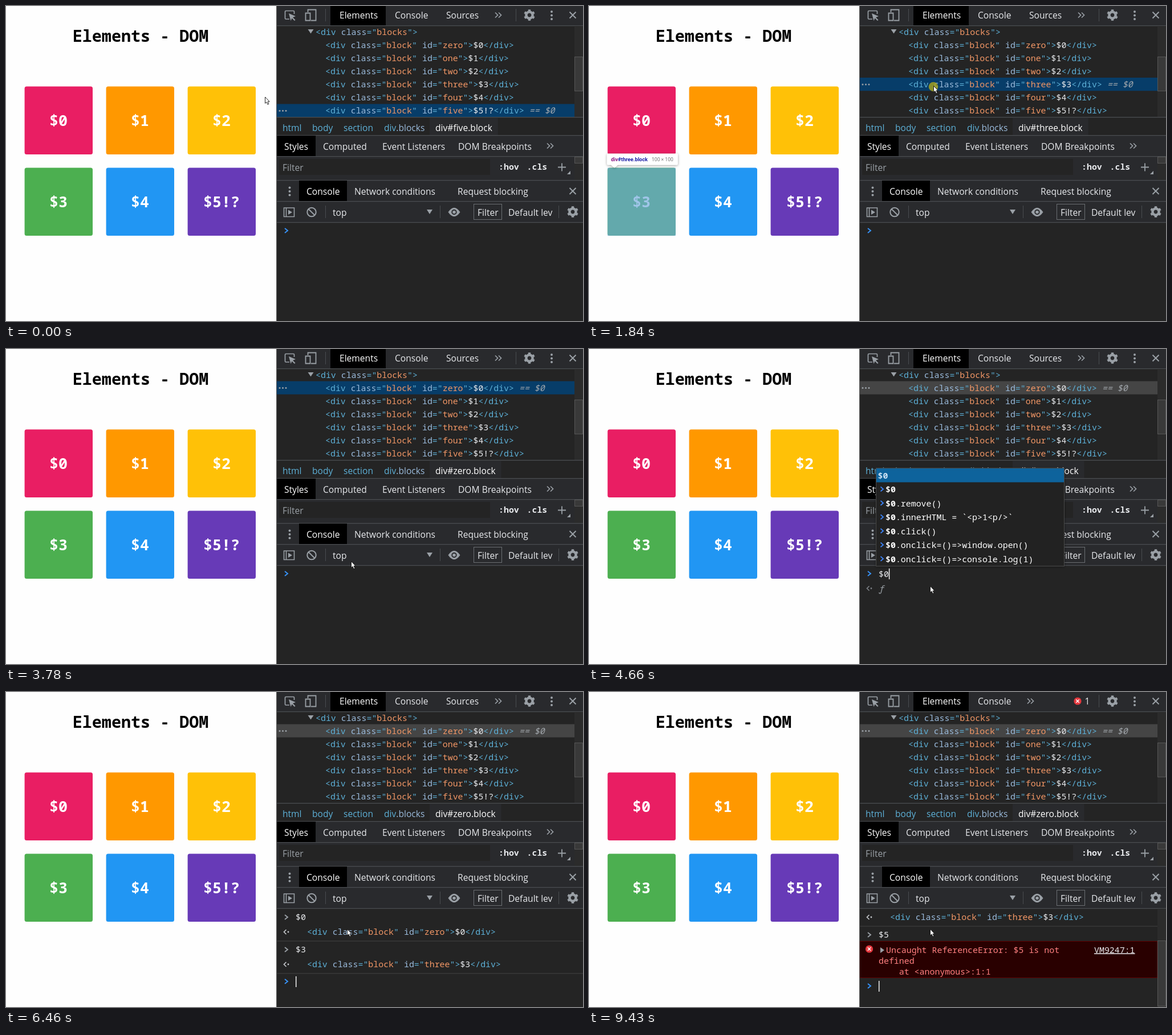
Write an HTML page that moves like this. It is 1012 by 554 pixels and loops after 9.61 s.

```html
<!DOCTYPE html>
<html lang="en">
<head>
<meta charset="utf-8">
<title>Elements - DOM</title>
<style>
html, body { margin: 0; width: 100%; height: 100%; overflow: hidden; background: #fefefe; }
svg { display: block; width: 1012px; height: 554px; }
text { white-space: pre; font: 15.6px "Open Sans", "Noto Sans", sans-serif; fill: #e8eaed; }
.m { font: 500 14.92px "Noto Sans Mono", "DejaVu Sans Mono", monospace; }
.b { font-weight: 700; }
.i { font-style: italic; }
.title { font: 600 28.4px "Noto Sans Mono", monospace; text-anchor: middle; fill: #000; }
.block { font: 700 26.7px "Noto Sans Mono", monospace; text-anchor: middle; fill: #fff; }
.tip { font: 700 9.2px Roboto, sans-serif; }
.size { font: 8.6px Roboto, sans-serif; }
.icon { fill: none; stroke: #9aa0a6; stroke-width: 2; }
</style>
</head>
<body>
<svg viewBox="0 0 1012 554">
  <defs>
    <clipPath id="log"><rect x="475" y="381" width="537" height="173"/></clipPath>
    <clipPath id="drop"><rect id="dropBox"/></clipPath>
    <filter id="shade" x="-20%" y="-20%" width="140%" height="160%">
      <feDropShadow dx="0" dy="1" stdDeviation="2" flood-opacity=".4"/>
    </filter>
  </defs>
  <g id="base"></g>
  <g id="view"></g>
  <g id="pointer">
    <circle id="press" r="8.3" cy="1.5" fill="#aaa51c"/>
    <path d="M.5 0V11.2L3 8.9L4.9 13.2L6.9 12.3L5 8.2H8.2Z" fill="#fff" stroke="#111" stroke-width=".9"/>
  </g>
</svg>
<script>
const LOOP = 9610, ROW = 23.15, TOP = 56.6, ITEM = 24.5;
const $ = id => document.getElementById(id);
const ids = ['zero', 'one', 'two', 'three', 'four', 'five'];
const labels = ['$0', '$1', '$2', '$3', '$4', '$5!?'];
const hues = ['#e91e63', '#ff9800', '#ffc107', '#4caf50', '#2196f3', '#673ab7'];
const TAG = '#5db0d7', ATTR = '#9bbbdc', VAL = '#f29766', GREY = '#9aa0a6', LINE = '#494c50';

// drawing helpers
const esc = s => s.replace(/&/g, '&amp;').replace(/</g, '&lt;');
const rect = (x, y, w, h, fill, more = '') =>
  `<rect x="${x}" y="${y}" width="${w}" height="${h}" fill="${fill}" ${more}/>`;
const path = (d, more = 'class="icon"') => `<path d="${d}" ${more}/>`;
const stroke = (d, width, color = GREY) => path(d, `fill="none" stroke="${color}" stroke-width="${width}"`);
const fill = d => path(d, `fill="${GREY}"`);
const dot = (x, y, r, color = GREY) => `<circle cx="${x}" cy="${y}" r="${r}" fill="${color}"/>`;
const span = (s, color, cls = '') => `<tspan fill="${color}" class="${cls}">${esc(s)}</tspan>`;
const rich = (x, y, inner, cls = 'm') => `<text x="${x}" y="${y}" class="${cls}">${inner}</text>`;
const text = (x, y, s, color = '#e8eaed', cls = '') => rich(x, y, span(s, color), cls);
const pen = document.createElement('canvas').getContext('2d');
const measure = (s, font) => (pen.font = font, pen.measureText(s).width);

const attr = (name, v) => span(' ' + name, ATTR) + span('="', TAG) + span(v, VAL) + span('"', TAG);
const node = i => span('<div', TAG) + attr('class', 'block') + attr('id', ids[i]) +
  span('>', TAG) + span(labels[i], '#e8eaed') + span('</div>', TAG);
const blockPos = i => [32.6 + 143 * (i % 3), 141.6 + 143 * (i > 2)];
const SIDE = 119.4;

const chevron = (y, color) => stroke(`M489 ${y - 4}l5 4l-5 4`, 1.9, color);
const returned = (y, color = GREY) => stroke(`M491.5 ${y - 4}l-4 4l4 4`, 1.7, color) + dot(495, y, 1.4, color);
const more = (x, y) => stroke(`M${x} ${y - 4.5}l4.5 4.5l-4.5 4.5m6 -9l4.5 4.5l-4.5 4.5`, 1.7);
const dots = (x, y) => [-6.5, 0, 6.5].map(d => dot(x, y + d, 2)).join('');
const cross = (x, y) => path(`M${x - 5.5} ${y - 5.5}l11 11m0 -11l-11 11`);
const fault = (x, y) => dot(x, y, 6.6, '#e5393f') +
  stroke(`M${x - 2.7} ${y - 2.7}l5.4 5.4m0 -5.4l-5.4 5.4`, 1.5, '#fff');
const bar = (x, y) => rect(x, y, 1, 22, LINE);
const gear = (x, y) => `<g transform="translate(${x} ${y})">` +
  `<circle r="5.6" fill="none" stroke="${GREY}" stroke-width="4.4"/>` +
  [0, 60, 120].map(a => path('M0 -9.8V-6.6M0 6.6V9.8',
    `stroke="${GREY}" stroke-width="4.4" transform="rotate(${a})"`)).join('') + '</g>';
const thumb = (x, y, w, h) => rect(x + .5, y + .5, w - 1, h - 1, '#393939', 'stroke="#565656"');

function buildBase() {
  let s = rect(0, 0, 474, 554, '#fefefe') + text(236, 63, 'Elements - DOM', '#000', 'title');
  ids.forEach((_, i) => {
    const [x, y] = blockPos(i);
    s += rect(x, y, SIDE, SIDE, hues[i], 'rx="3.5"') + text(x + 59.4, y + 69.4, labels[i], '#fff', 'block');
  });
  s += rect(474, 0, 538, 554, '#242424');
  // toolbars
  for (const [y, h] of [[0, 34], [228, 36], [265, 41], [307, 36], [344, 36]]) s += rect(474, y, 538, h, '#292a2d');
  s += rect(479, 269, 370, 28, '#242424');
  for (const y of [34, 195, 227, 264, 306, 343, 380]) s += rect(474, y, 538, 1.3, LINE);
  s += rect(569, 0, 97, 34, '#000') + rect(475, 228, 68, 36, '#000') + rect(514, 307, 84, 36, '#000');
  s += rect(997, 35, 15, 160, '#2b2b2b') + thumb(997, 89, 15, 61) + rect(997, 265, 15, 41, '#2b2b2b') + thumb(997, 265, 15, 12);
  s += rect(474, 0, 1.2, 554, '#555');
  // labels
  const ui = [[585, 22, 'Elements', '#fff'], [682, 22, 'Console'],
    [485, 219.5, 'html', TAG], [537, 219.5, 'body', TAG], [592, 219.5, 'section', TAG], [663, 219.5, 'div', TAG],
    [488, 252.5, 'Styles', '#fff'], [556, 252.5, 'Computed'], [660, 252.5, 'Event Listeners'],
    [793, 252.5, 'DOM Breakpoints'], [485, 289.5, 'Filter', GREY], [527, 331.5, 'Console', '#fff'],
    [611, 331.5, 'Network conditions'], [792, 331.5, 'Request blocking'],
    [573, 368.5, 'top'], [827, 368.5, 'Filter'], [881, 368.5, 'Default lev']];
  for (const [x, y, label, color] of ui) s += text(x, y, label, color);
  s += text(663 + measure('div', '15.6px "Open Sans"'), 219.5, '.blocks', ATTR);
  s += text(864, 288, ':hov', '#e8eaed', 'm b') + text(913.5, 288, '.cls', '#e8eaed', 'm b');
  // icons
  s += stroke('M497 23H491Q489.5 23 489.5 21.5V10Q489.5 8.5 491 8.5H504Q505.5 8.5 505.5 10V14', 1.7) +
    fill('M496 13L508 18L503 20L507.5 24.5L506 26L501.5 21.5L499.5 26Z') +
    stroke('M529.5 11V6.5H543.5V25.5H535M525.5 12.5H533.5V25.5H525.5Z', 1.8);
  s += bar(560, 5) + bar(894, 5) + gear(918, 16) + dots(957, 16.5) + cross(994, 16);
  s += more(949, 246) + dots(497.5, 326) + cross(994, 325.5);
  s += stroke('M968 283.5H982M975 276.5V290.5', 1.8) + fill('M990 290V296H984Z');
  s += stroke('M487.5 355H505.5V370.5H487.5ZM491.5 355V370.5', 1.6) + fill('M495 358.5L502 362.8L495 367Z');
  s += '<circle cx="536" cy="362.5" r="7.7" class="icon"/>' + path('M530.5 357L541.5 368') +
    bar(560, 351) + bar(761, 351) + bar(969, 351);
  s += fill('M738 358H748L743 366Z') + fill('M775.5 362.5Q786 347 796.5 362.5Q786 378 775.5 362.5Z') +
    dot(786, 362.5, 4.7, '#292a2d') + dot(786, 362.5, 2.8);
  return s + rect(820.5, 348.5, 49, 27, 'none', 'stroke="#6b6e72"') + gear(994, 362);
}

// timeline: pointer bursts as [start, end, steps]
const bursts = [[230, 750, 8], [920, 1390, 7], [1530, 2460, 13], [2530, 3460, 13], [3550, 4000, 7]];
const track = [[0, 454, 160], [160, 454, 160], [750, 602, 165], [850, 602, 165], [1000, 604, 163], [1460, 604, 163],
  [1700, 604, 140.5], [1900, 604, 140.5], [2200, 612, 117], [2480, 612, 117], [2700, 620, 93], [2850, 620, 93],
  [3080, 627, 70.5], [3350, 627, 70.5], [3460, 629, 92], [3700, 612, 330], [3850, 598, 417]];
const clicks = [[1070, 4], [1760, 3], [2300, 2], [2760, 1], [3300, 0], [3840, 0]];
const FOCUS = 3840;
const events = [
  [0, { typed: '', caret: 0, pop: 0, hint: '', mark: -1, done: [], error: 0, top: 2 }],
  [FOCUS, { caret: 1 }],
  [4420, { typed: '$' }],
  [4480, { pop: 1, hint: 'ƒ' }],
  [4660, { typed: '$0' }],
  [4800, { hint: 'div#zero.block', mark: 0 }],
  [4940, { pop: 0 }],
  [5190, { typed: '', hint: '', done: [0] }],
  [5290, { mark: -1 }],
  [5840, { typed: '$' }],
  [5910, { pop: 1, hint: 'ƒ' }],
  [6230, { typed: '$3', pop: 0 }],
  [6410, { hint: 'div#three.block', mark: 3 }],
  [6460, { typed: '', hint: '', mark: -1, done: [0, 3] }],
  [7020, { caret: 0 }],
  [7470, { caret: 1 }],
  [7790, { typed: '$', pop: 1, hint: 'ƒ', top: 4.7 }],
  [8180, { typed: '$5', pop: 0, hint: '' }],
  [8420, { typed: '', error: 1 }],
  [8970, { caret: 0 }],
  [9430, { caret: 1 }]
];

function snap(t) {
  let out = 0;
  for (const [a, b, n] of bursts) {
    if (t < a) break;
    const step = (b - a) / (n - 1);
    out = t >= b ? b : a + Math.floor((t - a) / step + 1e-6) * step;
  }
  return out;
}

function pointerAt(t) {
  const k = track.findIndex(p => p[0] > t);
  if (k < 0) return track[track.length - 1].slice(1);
  const [a, x, y] = track[k - 1], [b, u, v] = track[k];
  const f = (t - a) / (b - a), e = f * f * (3 - 2 * f);
  return [x + (u - x) * e, y + (v - y) * e];
}

function highlight(i) {
  const [x, y] = blockPos(i), name = `#${ids[i]}.block`;
  const w = measure('div' + name, '700 9.2px Roboto'), top = y - 25.2;
  const end = x + 13 + w + measure('100 × 100', '8.6px Roboto') + 6;
  return rect(x, y, SIDE, SIDE, '#6fa8dc', 'opacity=".66"') +
    path(`M${x + 1} ${top}H${end}q2 0 2 2V${top + 18}q0 2 -2 2H${x + 18}l-6 5l-6 -5H${x + 1}q-2 0 -2 -2V${top + 2}q0 -2 2 -2Z`,
      'fill="#fff" filter="url(#shade)"') +
    rich(x + 6, top + 13.5, span('div', '#881280') + span(name, '#1a1aa6'), 'tip') +
    text(x + 13 + w, top + 13.5, '100 × 100', '#777', 'size');
}

function tree(sel, hover, focused) {
  let s = fill('M529.5 41H539.5L534.5 48.5Z') +
    rich(543, 50.5, span('<div', TAG) + attr('class', 'blocks') + span('>', TAG));
  ids.forEach((_, i) => {
    const y = TOP + ROW * i, h = Math.min(ROW, 195 - y), on = i === sel;
    if (on) {
      s += rect(475, y, 522, h, focused ? '#073d69' : '#454545');
      for (const x of [480, 485.5, 491]) s += dot(x, y + 12, 1.5);
    } else if (i === hover) s += rect(479, y, 514, h, '#262d36', 'rx="5"');
    s += rich(560, y + 17, node(i) + (on ? span(' == $0', '#a4a9ae', 'i') : ''));
  });
  const crumb = `div#${ids[sel]}.block`;
  return s + rect(743, 197, measure(crumb, '15.6px "Open Sans"') + 20, 30, '#292a2d') + text(753, 219.5, crumb, '#fff');
}

function log(st) {
  const shift = st.error ? 83 : 0;
  let y = 395 - shift, s = '';
  const entry = n => chevron(y + 1, GREY) + text(508, y + 6, '$' + n, '#e8eaed', 'm');
  for (const n of st.done) {
    s += entry(n) + returned(y + 27, '#c5c8cc') + rich(528, y + 32, node(n)) + rect(475, y + 42.5, 537, 1, '#424242');
    y += 57;
  }
  if (st.error) {
    s += entry(5) + rect(475, 438.5, 522, 64, '#290000', 'stroke="#5c0000"') +
      fault(491.5, 452) + fill('M511 449V459L518 454Z');
    [[521, 'Uncaught ReferenceError: $5 is not'], [508, 'defined'], [508, '    at <anonymous>:1:1']]
      .forEach(([x, line], i) => s += text(x, 458.5 + 19 * i, line, '#ff8080', 'm'));
    s += '<text x="886" y="458.5" class="m" text-decoration="underline">VM9247:1</text>' +
      rect(997, 381, 15, 173, '#2b2b2b') + thumb(997, 437, 15, 116);
    y = 517;
  }
  s += chevron(y, '#3794ff') + text(508, y + 5.5, st.typed, '#e8eaed', 'm');
  if (st.caret) s += rect(508 + 8.95 * st.typed.length, y - 9, 1.4, 19, '#fff');
  if (st.hint) s += returned(y + 26, '#7d8186') + text(508, y + 31.5, st.hint, GREY, st.hint === 'ƒ' ? 'm i' : 'm');
  return [`<g clip-path="url(#log)">${s}</g>`, y];
}

const names = ['$', '$$', '$x', '$0', '$_'];
const calls = ["$('#prod-FunctionRestParameter')", '$0.remove()', '$0.innerHTML = `<p>1<p/>`', '$_', '$_()', '$__',
  '$_.splice(0, 1)', '$0.click()', '$0.onclick=()=>window.open()', '$0.onclick=()=>console.log(1)'];

function popup(st, bottom, mouse) {
  const recent = st.done.length > 1 ? [3, 0, 5, 1, 4, 2] : [0, 5, 3, 1, 4, 2];
  const past = recent.map(n => '$' + n).concat(calls);
  const fits = s => s.startsWith(st.typed);
  const own = names.filter(fits), all = own.concat(past.filter(fits));
  const full = all.length * ITEM, top = Math.max(bottom - full, st.top), h = bottom - top;
  const scroll = full > h + 1, w = scroll ? 356 : 329;
  const box = { x: 504, y: top, width: w, height: h };
  for (const k in box) $('dropBox').setAttribute(k, box[k]);
  let s = '';
  all.forEach((item, i) => {
    const y = top + i * ITEM, old = i >= own.length, under = mouse < bottom && mouse >= y && mouse < y + ITEM;
    if (!i || under) s += rect(504, y, w, ITEM, i ? '#272c38' : '#0e639c');
    if (old) s += stroke(`M511.5 ${y + 8}l4.5 4l-4.5 4`, 1.9, '#3b82f6');
    s += rich(old ? 520 : 506.5, y + 17.7, span(st.typed, i ? '#fff' : '#cfe3f5', 'b') + span(item.slice(st.typed.length), '#fff'));
  });
  if (scroll) s += rect(841, top, 19, h, '#2b2b2b') + thumb(841, top, 18, h * h / full);
  return rect(503.5, top - .5, w + 1, h + 1, '#242424', 'stroke="#4a4a4a" filter="url(#shade)"') +
    `<g clip-path="url(#drop)">${s}</g>`;
}

function badge(error) {
  if (!error) return text(772, 22, 'Sources') + more(858, 16);
  return more(769, 16) + fault(857, 16) + text(869.5, 22, '1');
}

let last = '';
function render(t) {
  const ts = snap(t), [x, y] = pointerAt(ts);
  const st = Object.assign({}, ...events.filter(e => e[0] <= (t < 4400 ? ts : t)).map(e => e[1]));
  const hit = clicks.filter(c => c[0] <= ts).pop();
  const row = Math.floor((y - TOP) / ROW);
  const hover = x > 475 && y < 195 && row >= 0 && row < 6 ? row : -1;
  const lit = hover >= 0 ? hover : st.mark;
  const [lines, promptY] = log(st);
  const out = tree(hit ? hit[1] : 5, hover, ts < FOCUS) + badge(st.error) + lines +
    (lit >= 0 ? highlight(lit) : '') + (st.pop ? popup(st, promptY - 13.6, y) : '');
  if (out !== last) $('view').innerHTML = last = out;
  $('pointer').setAttribute('transform', `translate(${x} ${y})`);
  const age = hit ? ts - hit[0] : 999;
  $('press').setAttribute('opacity', age < 150 ? 1 - age / 400 : 0);
}

$('base').innerHTML = buildBase();
const start = performance.now();
function tick() {
  render((performance.now() - start) % LOOP);
  requestAnimationFrame(tick);
}
tick();
</script>
</body>
</html>
```
